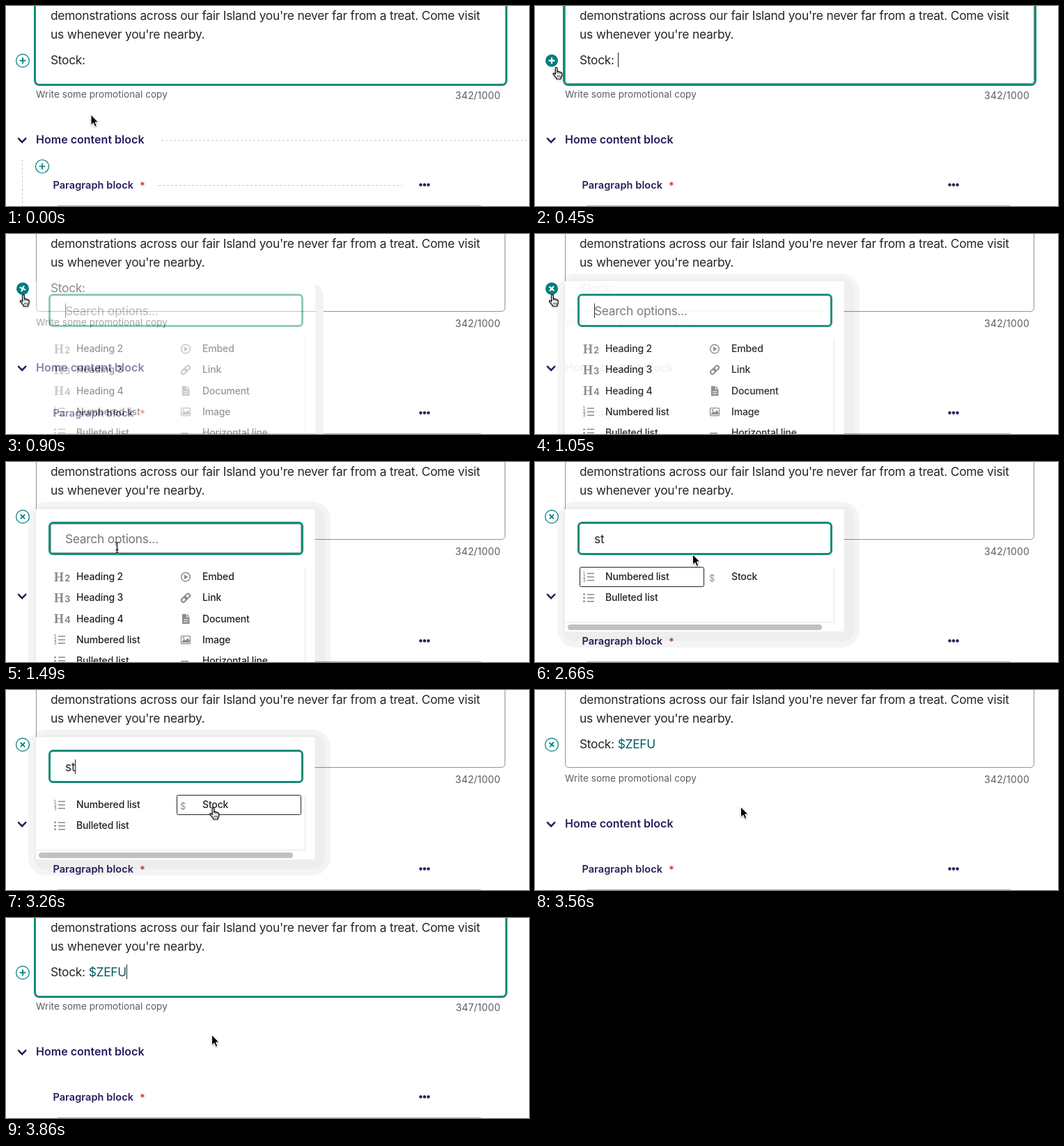
Recreate the animation shown at these times as an HTML page. Size 751 by 288 pixels, loop 4.15 s.

```html
<!DOCTYPE html>
<html lang="en">
<head>
<meta charset="utf-8">
<title>Stock block picker</title>
<style>
html, body { margin: 0; width: 100%; height: 100%; overflow: hidden; background: #fff; }
svg { display: block; width: 100vw; height: 100vh; }
text { font-family: Inter, Roboto, sans-serif; font-optical-sizing: none; white-space: pre; }
.body { font-size: 17.4px; letter-spacing: -.3px; word-spacing: .3px; fill: #262626; }
.help { font-size: 13.5px; letter-spacing: .07px; fill: #5c5c5c; }
.title { font-weight: 600; fill: #2a1c5c; }
.item { font-size: 14px; font-weight: 500; letter-spacing: -.15px; fill: #222; }
.icon { fill: none; stroke: #8a8a8a; stroke-width: 1.5; }
.solid { fill: #8a8a8a; stroke: none; }
.dash { fill: none; stroke: #c6c6c6; stroke-dasharray: 3 3; }
.focus { fill: none; stroke: #128c76; stroke-width: 3; }
.caret { stroke: #222; stroke-width: 1; }
.pick { fill: none; stroke: #222; }
.round { stroke: #007d7e; stroke-width: 1.2; }
#pointer { filter: drop-shadow(0 1px 1px rgba(0, 0, 0, .3)); }
</style>
</head>
<body>
<svg viewBox="0 0 751 288" preserveAspectRatio="none">
  <defs>
    <g id="bullets" class="icon"><path d="M75 -5H85M75 0H85M75 5H85"/></g>
  </defs>

  <g id="editor">
    <rect id="editorLine" x="43.5" y="-20" width="673" height="131.5" rx="5" fill="#fff"/>
    <rect id="editorFocus" class="focus" x="41.5" y="-20" width="677" height="133.5" rx="6"/>
    <g class="body">
      <text x="64" y="20">demonstrations across our fair Island you're never far from a treat. Come visit</text>
      <text x="64" y="47">us whenever you're nearby.</text>
      <text x="64" y="84">Stock: <tspan id="ticker" fill="#005b5e">$ZEFU</tspan></text>
    </g>
    <path id="editorCaret" class="caret" d="M0 67V88"/>
  </g>
  <text class="help" x="43" y="132">Write some promotional copy</text>
  <text id="count" class="help" x="710" y="134" text-anchor="end" style="font-size:14px;letter-spacing:.18px"></text>

  <path d="M18 190.800L23.100 196.100L28.200 190.800" fill="none" stroke="#2a1c5c" stroke-width="2.600" stroke-linecap="round"/>
  <text class="title" x="43" y="198" font-size="16" letter-spacing=".02">Home content block</text>
  <text class="title" x="67.400" y="263" font-size="14.5" letter-spacing=".08">Paragraph block</text>
  <text x="192" y="264" font-size="14.5" font-weight="600" fill="#cd3238">*</text>
  <g fill="#2a1c5c"><circle cx="595.5" cy="257.500" r="2.200"/><circle cx="601" cy="257.500" r="2.200"/><circle cx="606.500" cy="257.500" r="2.200"/></g>
  <path d="M74 287.500H682" stroke="#b4b4b4"/>
  <g id="guides">
    <path class="dash" d="M223 193.500H748M219 258.500H569M23.500 221V288"/>
    <circle class="round" cx="52" cy="231" r="9.500" fill="#fff"/>
    <path class="round" d="M47.500 231H56.500M52 226.500V235.500" style="stroke-width:1.7"/>
  </g>

  <circle id="button" class="round" cx="24" cy="78.700"/>
  <path id="plus" d="M-4.500 0H4.500M0 -4.500V4.500"/>

  <path id="edge" d="M444 72Q456 77 456 92V288H444Z" fill="#f2f2f2"/>
  <g id="popup">
    <g id="glow" fill="#000">
      <rect id="glowOut" x="32" y="57" width="434" rx="26" fill-opacity=".045"/>
      <rect id="glowIn" x="40" y="64" width="418" rx="16" fill-opacity=".025"/>
    </g>
    <rect id="panel" x="43" y="68" width="400.500" fill="#fff"/>
    <rect id="fieldLine" x="64.500" y="89.500" width="359" height="41" rx="3" fill="#fff"/>
    <rect class="focus" x="62.500" y="87.500" width="363" height="45" rx="5"/>
    <text id="query" class="body" x="85" y="117"></text>
    <path id="queryCaret" class="caret" d="M0 100V121"/>
    <path id="rule" stroke="#e6e6e6" fill="none"/>
    <g id="all"></g>
    <g id="few">
      <rect id="pick" class="pick" y="151.500" width="178" height="28" rx="2"/>
      <rect x="47" y="234" width="365" height="8" rx="4" fill="#c1c1c1"/>
    </g>
  </g>

  <g id="pointer">
    <path id="arrow" d="M0 -.5V14.500L3.400 11.300L5.800 16.800L8.300 15.700L6 10.300H10.500Z" fill="#000" stroke="#fff"/>
    <g id="beam" fill="none">
      <path d="M-3 -8Q0 -8 0 -6Q0 -8 3 -8M0 -6V6M-3 8Q0 8 0 6Q0 8 3 8M-2 3H2" stroke="#fff" stroke-width="2.600"/>
      <path d="M-3 -8Q0 -8 0 -6Q0 -8 3 -8M0 -6V6M-3 8Q0 8 0 6Q0 8 3 8M-2 3H2" stroke="#000" stroke-width="1.200"/>
    </g>
    <g id="hand" stroke="#000" stroke-width="1.200" stroke-linejoin="round">
      <path d="M4 11V2.200Q4 .7 5.300 .7Q6.600 .7 6.600 2.200V7Q8.600 5.500 9.100 7.500Q11 6.300 11.400 8.300Q13.400 7.600 13.400 9.600V12Q13.400 14 12 15.500V17.300H5.500V16L1.200 11Q.2 9.300 1.500 8.800Q2.600 8.600 4 11Z" fill="#fff"/>
      <path d="M6.600 7V9.500M9.100 7.500V9.800M11.400 8.300V10M7 12V15M9 12V15M11 12V15" fill="none" stroke-width=".8"/>
    </g>
  </g>
</svg>
<script>
const LOOP = 4150;
const $ = id => document.getElementById(id);
const set = (id, attrs) => { for (const k in attrs) $(id).setAttribute(k, attrs[k]); };
const show = (id, on) => set(id, { display: on ? 'inline' : 'none' });

// Value of the last step that has begun.
const step = (t, steps) => steps.reduce((v, [at, next]) => t >= at ? next : v, null);
const within = (t, from, to) => t >= from && t < to;

const heading = n => `<text class="solid" x="69" y="6" style="font:bold 18px 'Liberation Serif',serif">H</text>
  <text class="solid" x="84" y="6" font-size="13" font-weight="700">${n}</text>`;
const icons = {
  'Heading 2': heading(2),
  'Heading 3': heading(3),
  'Heading 4': heading(4),
  'Numbered list': '<use href="#bullets"/>' + [1, 2, 3].map(n =>
    `<text class="solid" x="69" y="${n * 5 - 8}" font-size="5.5" font-weight="700">${n}</text>`).join(''),
  'Bulleted list': '<use href="#bullets"/>' + [-5, 0, 5].map(y =>
    `<circle class="solid" cx="70.500" cy="${y}" r="1.400"/>`).join(''),
  'Embed': '<circle class="icon" cx="258" cy="0" r="6.300"/><path class="solid" d="M256 -3.500L261.500 0L256 3.500Z"/>',
  'Link': `<g class="icon" style="stroke-width:2" transform="translate(258 0) rotate(-45)">
    <rect x="-7.500" y="-2.700" width="8.500" height="5.400" rx="2.700"/><rect x="-1" y="-2.700" width="8.500" height="5.400" rx="2.700"/></g>`,
  'Document': '<path class="solid" d="M253 -7H259V-2.500H263.500V7H253ZM260 -7L263.500 -3.500H260Z"/><path d="M255 1H261.500M255 4H261.500" stroke="#fff"/>',
  'Image': '<rect class="icon" x="251.500" y="-5.500" width="13" height="11" rx="1" style="stroke-width:1.2"/><path class="solid" d="M253 4V2L256 -1L258 1L261 -2.500L263.500 .5V4Z"/><circle class="solid" cx="255" cy="-2.500" r="1.300"/>',
  'Horizontal line': '<path class="icon" d="M251 .5H262"/>',
  'Stock': '<text class="solid" x="250" y="6" font-size="13">$</text>'
};
const item = (name, col, row) => `<g transform="translate(0 ${165.5 + row * 30.2})">${icons[name]}
  <text class="item" x="${col ? 282 : 101}" y="4.700">${name}</text></g>`;

const left = ['Heading 2', 'Heading 3', 'Heading 4', 'Numbered list', 'Bulleted list'];
const right = ['Embed', 'Link', 'Document', 'Image', 'Horizontal line'];
$('all').innerHTML = left.map((n, i) => item(n, 0, i)).join('') + right.map((n, i) => item(n, 1, i)).join('');
$('few').insertAdjacentHTML('beforeend',
  item('Numbered list', 0, 0) + item('Bulleted list', 0, 1) + item('Stock', 1, 0));

const path = [
  [0, ['arrow', 122, 157]], [150, ['arrow', 56.5, 92]], [300, ['arrow', 41.5, 80]],
  [450, ['hand', 25.3, 87.7]], [600, ['hand', 19.7, 86.7]], [1340, ['hand', 26, 90]],
  [1490, ['beam', 159.5, 123.5]], [1630, ['beam', 171, 130]], [1780, ['beam', 177, 125]],
  [1920, ['beam', 176, 118]], [2520, ['beam', 180, 119]],
  [2660, ['arrow', 226.5, 133.5]], [2810, ['arrow', 252, 150]],
  [2960, ['hand', 258, 157]], [3110, ['hand', 277.5, 161.5]], [3260, ['hand', 292.2, 168.7]],
  [3560, ['arrow', 295.5, 168.7]]
];

function draw(t) {
  // Editor: its grey line turns white when focused without hover.
  show('guides', t < 150);
  set('editorLine', { stroke: within(t, 150, 3710) ? '#929292' : '#fff' });
  show('editorFocus', !within(t, 750, 3710));
  show('ticker', t >= 3560);
  show('editorCaret', within(t, 450, 750) || t >= 3710);
  set('editorCaret', { transform: `translate(${t < 750 ? 119.5 : 173.5} 0)` });
  $('count').textContent = (t < 3710 ? 342 : 347) + '/1000';

  // Round button
  const hover = within(t, 450, 1490);
  const turn = step(t, [[0, 0], [750, 8], [900, 24], [1050, 40], [1200, 45], [3560, 38], [3710, 14], [3860, 0]]);
  set('button', { fill: hover ? '#007d7e' : '#fff', r: hover ? 8.4 : 9.4 });
  set('plus', {
    stroke: hover ? '#fff' : '#007d7e',
    'stroke-width': hover ? 2.2 : 1.8,
    transform: `translate(24 78.7) rotate(${turn})`
  });

  // Popup
  const few = t >= 2070;
  const bottom = few ? 244 : 330;
  show('popup', within(t, 900, 3560));
  show('edge', within(t, 900, 1050));
  show('glow', t >= 1050);
  set('popup', { opacity: step(t, [[0, 0], [900, .46], [1050, .94], [1200, 1]]) });
  set('panel', { height: bottom - 68 });
  set('glowOut', { height: bottom + 23 - 57 });
  set('glowIn', { height: bottom + 14 - 64 });
  set('rule', { d: few ? 'M429.500 151V230.500H44' : 'M429.500 151V288' });
  set('fieldLine', { stroke: within(t, 1490, 2660) ? '#a9a9a9' : '#fff' });
  show('all', !few);
  show('few', few);
  set('pick', { x: t < 2960 ? 64.5 : 245.5 });
  $('query').textContent = step(t, [[0, 'Search options...'], [2070, 's'], [2220, 'st']]);
  set('query', { style: few ? '' : 'fill:#767676' });
  show('queryCaret', within(t, 900, 1340) || within(t, 1920, 2220) || t >= 3260);
  set('queryCaret', { transform: `translate(${step(t, [[0, 85.5], [2070, 93.5], [2220, 99.5]])} 0)` });

  // Pointer
  const [kind, x, y] = step(t, path);
  for (const k of ['arrow', 'beam', 'hand']) show(k, k === kind);
  set('pointer', { transform: `translate(${x} ${y})` });
}

const start = performance.now();
function tick() {
  draw((performance.now() - start) % LOOP);
  requestAnimationFrame(tick);
}
tick();
</script>
</body>
</html>
```
